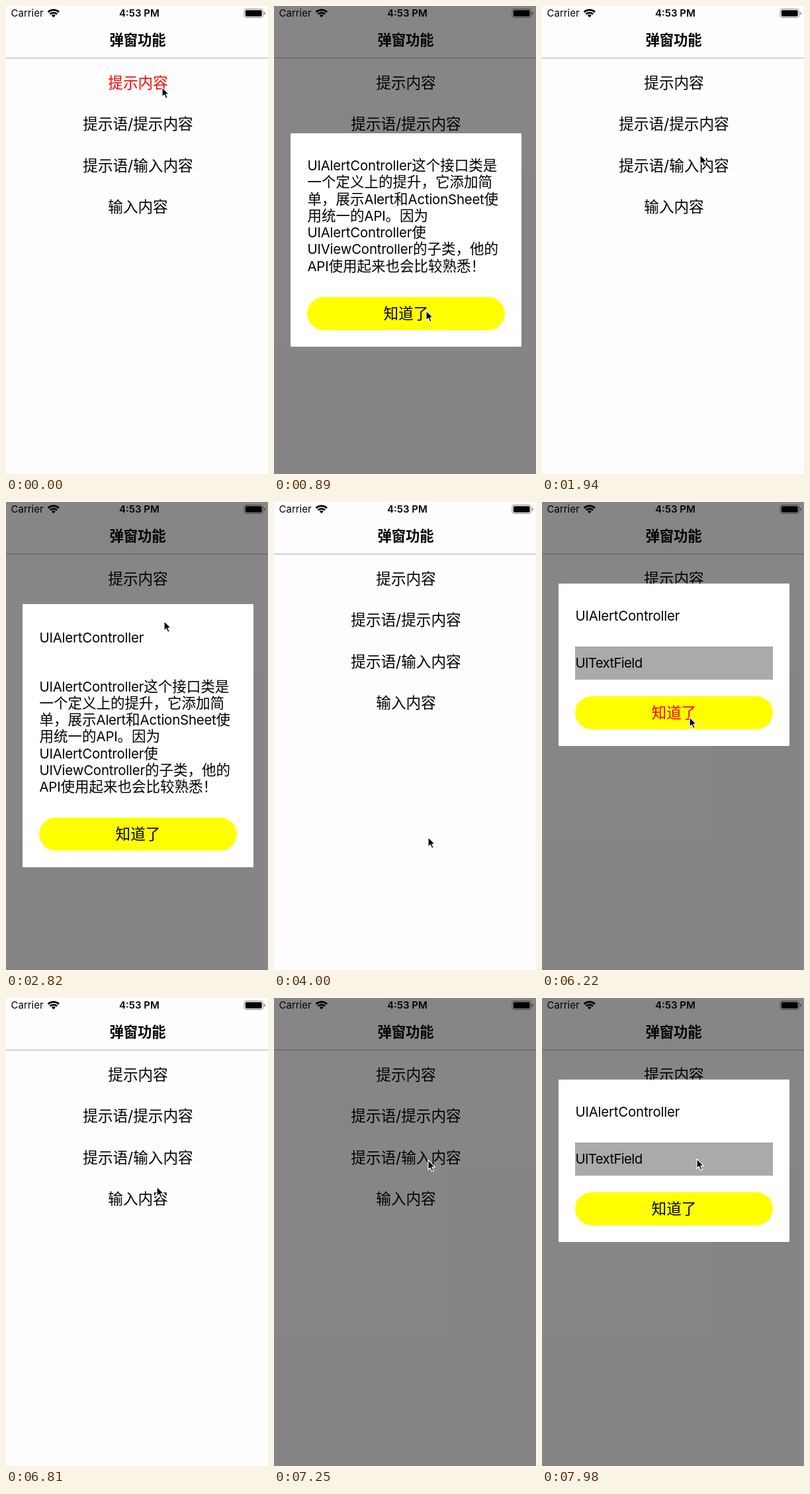
These frames come from a looping animation (396x706 px, 8 s). An HTML page:

```html
<!DOCTYPE html>
<html lang="zh-CN">
<head>
<meta charset="utf-8">
<title>弹窗功能</title>
<style>
  html, body { margin: 0; width: 100%; height: 100%; overflow: hidden; background: #fefefe; }
  #stage {
    position: relative; width: 396px; height: 706px; overflow: hidden; background: #fefefe; color: #000;
    font-family: Inter, "Noto Sans CJK SC", "Noto Sans CJK", sans-serif;
  }
  #stage * { box-sizing: border-box; }
  #stage div, #stage svg { position: absolute; }
  .line { white-space: nowrap; height: 30px; line-height: 30px; font-size: 21.5px; }
  .line i { font-style: normal; font-size: 20.4px; letter-spacing: -.2px; }
  .mid { left: 0; width: 100%; text-align: center; }
  .row, .button .line { font-size: 22.6px; }
  .title { font-size: 21.3px; font-weight: 600; }
  .status { font-size: 15px; }
  .rule { left: 0; top: 77.5px; width: 396px; height: 1px; background: #b2b2b2; }
  #dim { inset: 0; background: rgba(0, 0, 0, .475); }
  .dialog { left: 25px; width: 349px; background: #fff; backface-visibility: hidden; }
  .field { left: 25px; width: 299px; height: 50px; background: #aaa; }
  .field i { letter-spacing: -.65px; }
  .button { left: 25px; width: 299px; height: 50px; border-radius: 25px; background: #ff0; }
  .red { color: #f00; }
</style>
</head>
<body>
<div id="stage">
  <div class="line status" style="left:7.5px;top:-4px">Carrier</div>
  <svg style="left:62px;top:3px" width="20" height="15" fill="none" stroke="#000" stroke-width="2.7">
    <path d="M1.6 6.2A11.8 11.8 0 0 1 18 6.2M4.5 9.2A7.6 7.6 0 0 1 15.1 9.2"/>
    <path d="M9.8 14.2L6.9 11.2A4.2 4.2 0 0 1 12.7 11.2Z" fill="#000" stroke="none"/>
  </svg>
  <div class="line status" style="left:171px;top:-4px;font-weight:600">4:53 PM</div>
  <svg style="left:359px;top:3px" width="34" height="16">
    <rect x="1" y="1.5" width="28.5" height="13" rx="3" fill="none" stroke="#8c8c8c"/>
    <rect x="2.8" y="3.3" width="24.9" height="9.4" rx="1.6"/>
    <path d="M31 5.6Q33 6.3 33 8T31 10.4Z" fill="#8c8c8c"/>
  </svg>
  <div class="line mid title" style="top:36px;width:398px">弹窗功能</div>
  <div class="rule"></div>
  <div id="dim"></div>
  <svg id="cursor" style="left:-2px;top:-2px" width="18" height="24">
    <path d="M2 1.6V16.2L5.3 13.1L7.6 18.6L10.2 17.5L7.9 12.1H12.4Z" stroke="#fff" stroke-width="1.2" stroke-linejoin="round"/>
  </svg>
</div>
<script>
const LOOP = 8000, FLIP = 500, HALF = 174.5;
const $ = id => document.getElementById(id);
const stage = $('stage'), dim = $('dim'), cursor = $('cursor');

const body = `UIAlertController这个接口类是
一个定义上的提升，它添加简
单，展示Alert和ActionSheet使
用统一的API。因为
UIAlertController使
UIViewController的子类，他的
API使用起来也会比较熟悉！`.split('\n');

function add(parent, cls, style, before = null) {
  const el = document.createElement('div');
  el.className = cls;
  Object.assign(el.style, style);
  return parent.insertBefore(el, before);
}

// One line of text, vertically centred on y
function line(parent, text, y, left, cls = '', before = null) {
  const style = { top: y - 15 + 'px' };
  if (left !== null) style.left = left + 'px';
  const el = add(parent, 'line ' + cls, style, before);
  el.innerHTML = text.replace(/[A-Za-z]+/g, '<i>$&</i>');
  return el;
}

const rows = ['提示内容', '提示语/提示内容', '提示语/输入内容', '输入内容'].map((text, i) => {
  const el = line(stage, text, 116 + i * 62.3, null, 'mid row', dim);
  el.style.width = '399px';
  return el;
});

function dialog(top, height, fill) {
  const el = add(stage, 'dialog', { top: top + 'px', height: height + 'px' }, cursor);
  fill(el);
  const button = add(el, 'button', { top: height - 74.7 + 'px' });
  return { el, label: line(button, '知道了', 25, null, 'mid') };
}

const paragraph = (el, y) => body.forEach((text, i) => line(el, text, y + i * 25.25, 25.5));

const dialogs = [
  dialog(191.5, 322, el => paragraph(el, 48.5)),
  dialog(154, 397, el => { line(el, 'UIAlertController', 50, 25.5); paragraph(el, 123.5); }),
  dialog(123, 245, el => {
    line(el, 'UIAlertController', 48, 25.5);
    line(add(el, 'field', { top: '95.3px' }), 'UITextField', 24, .5);
  })
];

// The screen refreshes in bursts: first time, last time, count
const ticks = [0];
for (const [from, to, n] of [
  [140, 440, 3], [740, 1490, 6], [1940, 2820, 7], [3260, 3700, 4], [4000, 4580, 5],
  [4880, 5320, 4], [5770, 5920, 2], [6220, 6370, 2], [6810, 7830, 8], [7980, 7980, 1]
]) {
  for (let i = 0; i < n; i++)
    ticks.push(Math.round((from + (to - from) * i / Math.max(1, n - 1)) / 10) * 10);
}

// Time, x, y of the pointer tip
const path = [
  [0, 236, 123], [590, 236, 123], [890, 230, 460], [1190, 230, 460], [1490, 238, 270],
  [1790, 238, 270], [2090, 239, 180], [3110, 239, 180], [3550, 233, 506], [4000, 233, 506],
  [4440, 237, 246], [5620, 237, 246], [5920, 223, 325], [6660, 223, 325], [6960, 233, 245],
  [7830, 233, 245], [7980, 234, 243], [LOOP, 234, 243]
];

// Dialog index, shown from, shown until, start of the cube turn
const shows = [[0, 140, 1190, -60], [1, 2380, 4000, 2300], [2, 4880, 6370, 4800], [2, 7250, LOOP, 7225]];

// Label, pressed from, pressed until
const presses = [
  [rows[0], 0, 140], [dialogs[0].label, 1040, 1190], [rows[1], 2230, 2380],
  [dialogs[1].label, 3700, 4000], [rows[2], 4580, 4880], [dialogs[2].label, 6220, 6370],
  [rows[2], 7100, 7250]
];

const within = (t, a, b) => t >= a && t < b;

function pointer(t) {
  const k = path.findIndex(p => p[0] > t);
  const [a, ax, ay] = path[k - 1], [b, bx, by] = path[k];
  const p = (t - a) / (b - a);
  return [ax + (bx - ax) * p, ay + (by - ay) * p];
}

// Right-hand face of a cube turning to the front, darker while it faces away
function turn(el, p) {
  const angle = 90 * (.5 + .5 * Math.cos(Math.PI * Math.min(1, p)));
  const flat = angle < .01;
  el.style.visibility = angle > 81 ? 'hidden' : 'visible';
  el.style.transform = flat ? 'none'
    : `perspective(900px) translateZ(${-HALF}px) rotateY(${angle}deg) translateZ(${HALF}px)`;
  el.style.filter = flat ? 'none' : `brightness(${1 - .75 * angle / 90})`;
}

function draw(t) {
  const show = shows.find(s => within(t, s[1], s[2]));
  dim.style.visibility = show ? 'visible' : 'hidden';
  dialogs.forEach(d => { d.el.style.visibility = 'hidden'; });
  if (show) turn(dialogs[show[0]].el, (t - show[3]) / FLIP);

  presses.forEach(p => p[0].classList.remove('red'));
  presses.forEach(([el, a, b]) => { if (within(t, a, b)) el.classList.add('red'); });

  const [x, y] = pointer(t);
  cursor.style.transform = `translate(${Math.round(x)}px, ${Math.round(y)}px)`;
}

const start = performance.now();
let last = -1;
function frame() {
  const now = (performance.now() - start) % LOOP;
  const t = ticks.filter(v => v <= now).pop();
  if (t !== last) draw(last = t);
  requestAnimationFrame(frame);
}
frame();
</script>
</body>
</html>
```
